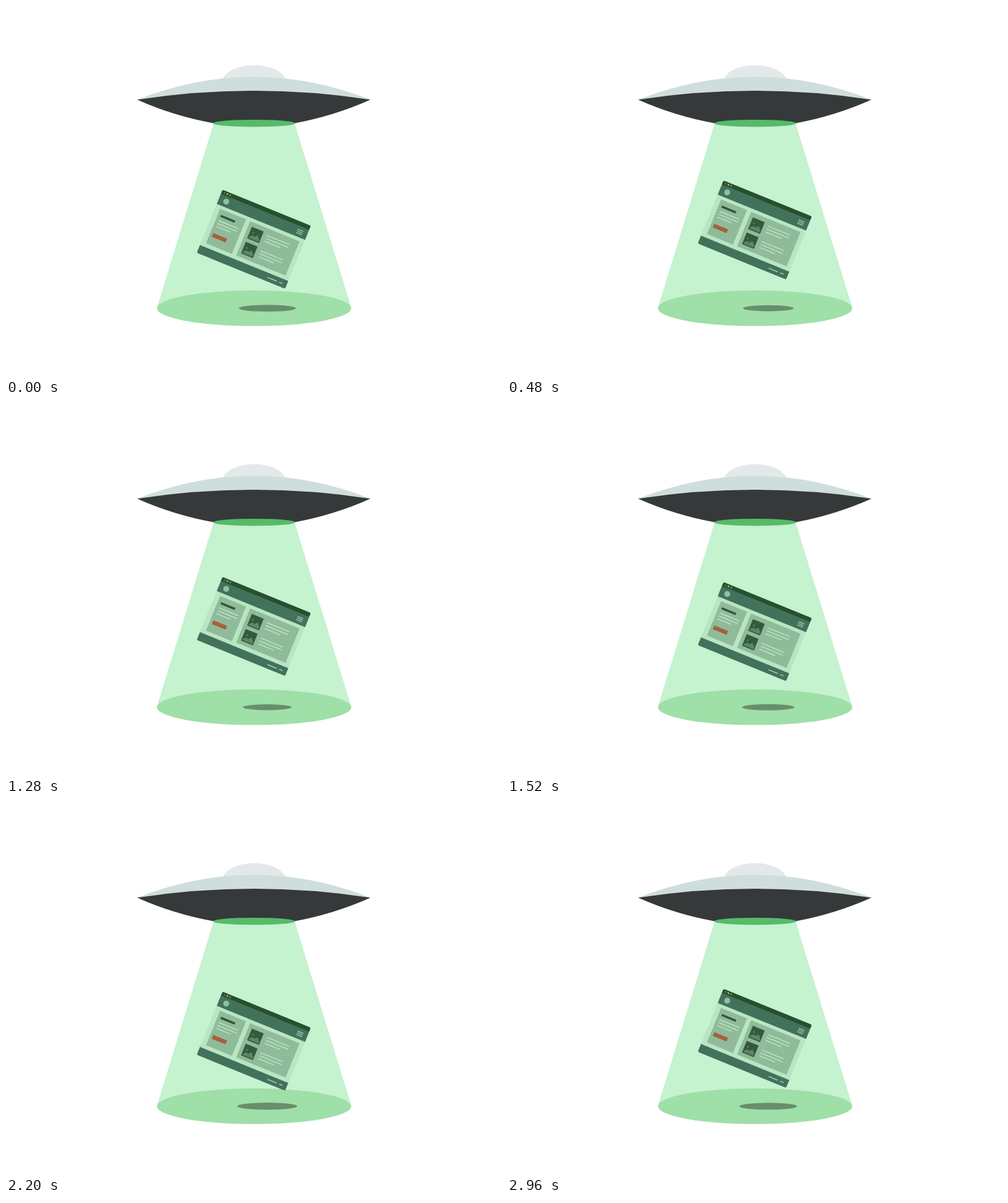
Recreate the animation shown at these times as an HTML page with a canvas. Size 800x600 px, loop 3000 ms.

```html
<!DOCTYPE html>
<html lang="en">
<head>
<meta charset="utf-8">
<title>Abduction</title>
<style>
html, body { margin: 0; width: 100%; height: 100%; overflow: hidden; background: #fff; }
canvas { display: block; }
</style>
</head>
<body>
<canvas id="stage" width="800" height="600"></canvas>
<script>
const ctx = document.getElementById('stage').getContext('2d');
const LOOP = 3000, HALF = LOOP / 2, TURN = 1200;
const HIGH = 357.1, LOW = 385.7;
const CARD = { x: 400.5, w: 154.5, h: 110.5, tilt: 22.2 * Math.PI / 180 };
const TEXT = '#bde8c7', DARK = '#35593d', PANEL = '#90bb9b', HEADER = '#42725c';

// cubic-bezier(.25, .1, .25, 1)
function ease(u) {
  const bez = (a, b, s) => 3 * a * s * (1 - s) ** 2 + 3 * b * s * s * (1 - s) + s ** 3;
  let lo = 0, hi = 1;
  for (let i = 0; i < 30; i++) {
    const mid = (lo + hi) / 2;
    if (bez(0.25, 0.25, mid) < u) lo = mid; else hi = mid;
  }
  return bez(0.1, 1, lo);
}

// 0 when the page floats highest, 1 when lowest
function dropAt(t) {
  const p = (t - TURN + LOOP) % LOOP;
  return p < HALF ? ease(p / HALF) : 1 - ease((p - HALF) / HALF);
}

function fill(color, d) {
  ctx.fillStyle = color;
  ctx.fill(new Path2D(d));
}

function oval(color, x, y, rx, ry = rx) {
  ctx.fillStyle = color;
  ctx.beginPath();
  ctx.ellipse(x, y, rx, ry, 0, 0, Math.PI * 2);
  ctx.fill();
}

function box(color, x1, y1, x2, y2) {
  ctx.fillStyle = color;
  ctx.fillRect(x1, y1, x2 - x1, y2 - y1);
}

function line(x1, x2, y, width = 1.4, color = TEXT) {
  box(color, x1, y - width / 2, x2, y + width / 2);
}

function lines(x, ends, y, gap) {
  ends.forEach((end, i) => line(x, end, y + i * gap));
}

function picture(x, y) {
  ctx.save();
  ctx.translate(x, y);
  box(DARK, 0, 0, 20.7, 20.3);
  oval('#5c8767', 5.6, 8.5, 1.4);
  fill('#5c8767', 'M1.8 18.5V16.5L6 12.8Q7 12 8 12.8L9.6 14L13 10.3Q14 9.4 15 10.4L19 15V18.5Z');
  ctx.restore();
}

function drawShip() {
  fill('#c5f2cf', 'M335.5 190L244.5 486V489H557.5V486L466.5 190Z');
  oval('#9fdfa8', 401, 488.8, 157, 28.8);
  fill('#e2eae9', 'M350 119C362 88 440 88 452 119Z');
  fill('#cfdedd', 'M212 151.5Q400.5 77.5 589 151.5Z');
  fill('#35393a', 'M212 151.5Q400.5 122.5 589 151.5Q531 177.5 467 189.5H335Q270 177.5 212 151.5Z');
  oval('#57ba69', 401, 189.7, 66, 5.8);
}

function drawCard(y) {
  const { x, w, h, tilt } = CARD;
  ctx.save();
  ctx.translate(x, y);
  ctx.rotate(tilt);
  ctx.translate(-w / 2, -h / 2);

  ctx.save();
  ctx.beginPath();
  ctx.roundRect(0, 0, w, h, 3);
  ctx.clip();
  box('#b8e5c2', 0, 7, w, 98);
  box('#27502f', 0, 0, w, 7.7);
  box(HEADER, 0, 7.5, w, 24.9);
  box(HEADER, 0, 96.7, w, h);
  ctx.restore();

  ['#a5613c', '#b5c862', '#62ae50'].forEach((c, i) => oval(c, 5.4 + i * 4.75, 3.7, 1.4));
  oval('#8fc09c', 13, 15.8, 4.8);
  for (let i = 0; i < 3; i++) line(136.7, 146.6, 13.3 + i * 2.9, 1.3, '#a3d2af');

  box(PANEL, 8.2, 30.2, 53.5, 90.6);
  line(13.4, 38.3, 40.5, 3.6, '#30573a');
  lines(13.4, [47.3, 47.3, 37.8], 48.7, 5.1);
  box('#a5613c', 12.9, 70.7, 36.9, 77.3);

  box(PANEL, 60.7, 30.5, 147, 90.3);
  picture(66.7, 37.6);
  picture(66.7, 63.9);
  lines(94.7, [133.4, 133.4, 122], 41.5, 5.1);
  lines(94.7, [133.4, 133.4, 122], 68.4, 5.1);

  line(121, 137.2, 104, 1.5, '#a3d2af');
  line(141.4, 147.5, 104, 1.5, '#a3d2af');
  ctx.restore();
}

function draw(t) {
  const drop = dropAt(t);
  const size = 0.8 + 0.2 * drop;
  ctx.fillStyle = '#fff';
  ctx.fillRect(0, 0, 800, 600);
  drawShip();
  oval('#668f6b', 422.3, 488.8, 49.1 * size, 5.8 * size);
  drawCard(HIGH + (LOW - HIGH) * drop);
}

const start = performance.now();
function tick() {
  draw((performance.now() - start) % LOOP);
  requestAnimationFrame(tick);
}
tick();
</script>
</body>
</html>
```
